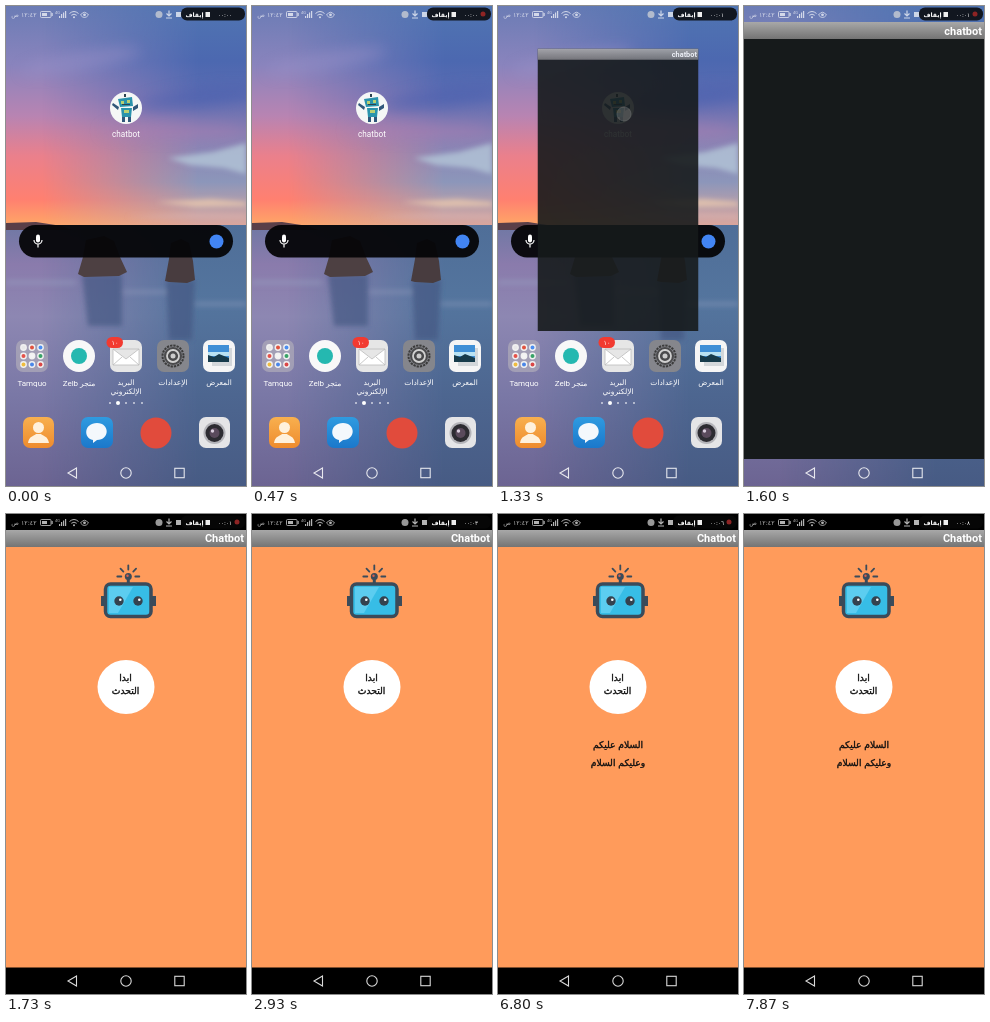
These frames come from a looping animation (240x480 px, 8000 ms). An HTML page:

```html
<!DOCTYPE html>
<html lang="ar">
<head>
<meta charset="utf-8">
<title>Chatbot</title>
<style>
  html, body { margin: 0; width: 100%; height: 100%; overflow: hidden; background: #000; }
  svg { display: block; width: 100%; height: 100%; }
  text { font-family: Roboto, "DejaVu Sans", sans-serif; fill: #fff; }
  .mid { text-anchor: middle; }
  .end { text-anchor: end; }
  .bold { font-weight: 700; }
  .label { font-size: 8px; text-anchor: middle; }
  .ar { font-family: "DejaVu Sans", sans-serif; font-size: 7.5px; text-anchor: middle; }
  .ink { font-size: 9.2px; fill: #111; stroke: #111; stroke-width: .35px; }
  .line { fill: none; stroke: #fff; }
</style>
</head>
<body>
<svg viewBox="0 0 240 480" preserveAspectRatio="none">
  <defs>
    <linearGradient id="skyLeft" x2="0" y2="1">
      <stop offset="0" stop-color="#6b7cb5"/>
      <stop offset=".27" stop-color="#8a84bd"/>
      <stop offset=".5" stop-color="#b884b2"/>
      <stop offset=".68" stop-color="#ea808c"/>
      <stop offset=".88" stop-color="#ff8070"/>
      <stop offset="1" stop-color="#ffa866"/>
    </linearGradient>
    <linearGradient id="skyRight" x2="0" y2="1">
      <stop offset="0" stop-color="#5075b2"/>
      <stop offset=".25" stop-color="#4c68b0"/>
      <stop offset=".42" stop-color="#5d6cb2"/>
      <stop offset=".57" stop-color="#8a7db2"/>
      <stop offset=".8" stop-color="#8c96ba"/>
      <stop offset="1" stop-color="#dca69c"/>
    </linearGradient>
    <linearGradient id="seaLeft" x2="0" y2="1">
      <stop offset="0" stop-color="#6f78a4"/>
      <stop offset=".15" stop-color="#8a7bac"/>
      <stop offset=".35" stop-color="#8d87b2"/>
      <stop offset=".65" stop-color="#7a78a6"/>
      <stop offset="1" stop-color="#6c6492"/>
    </linearGradient>
    <linearGradient id="seaRight" x2="0" y2="1">
      <stop offset="0" stop-color="#4f6e98"/>
      <stop offset=".3" stop-color="#54759e"/>
      <stop offset=".65" stop-color="#4d6690"/>
      <stop offset="1" stop-color="#475b84"/>
    </linearGradient>
    <linearGradient id="across">
      <stop offset=".15" stop-color="#000"/>
      <stop offset=".8" stop-color="#fff"/>
    </linearGradient>
    <mask id="rightward"><path fill="url(#across)" d="M0 0H240V480H0Z"/></mask>
    <linearGradient id="bar" x2="0" y2="1">
      <stop offset="0" stop-color="#a8a8a8"/>
      <stop offset="1" stop-color="#747474"/>
    </linearGradient>
    <linearGradient id="orange" x2="0" y2="1">
      <stop offset="0" stop-color="#f8b04f"/>
      <stop offset="1" stop-color="#ee8b2d"/>
    </linearGradient>
    <linearGradient id="blue" x2="0" y2="1">
      <stop offset="0" stop-color="#2f9be0"/>
      <stop offset="1" stop-color="#1b78cb"/>
    </linearGradient>
    <filter id="soft" x="-50%" y="-100%" width="200%" height="300%"><feGaussianBlur stdDeviation="7"/></filter>
    <filter id="haze" x="-50%" y="-100%" width="200%" height="300%"><feGaussianBlur stdDeviation="2.5"/></filter>
  </defs>

  <g id="home">
    <path fill="url(#skyLeft)" d="M0 0H240V220H0Z"/>
    <path fill="url(#skyRight)" d="M0 0H240V220H0Z" mask="url(#rightward)"/>
    <g filter="url(#soft)" opacity=".5">
      <ellipse cx="75" cy="55" rx="60" ry="8" fill="#9a91c8" transform="rotate(-10 75 55)"/>
      <ellipse cx="190" cy="92" rx="60" ry="9" fill="#4a5fae" transform="rotate(-8 190 92)"/>
      <ellipse cx="165" cy="125" rx="70" ry="7" fill="#a97fb2"/>
    </g>
    <g filter="url(#haze)">
      <path fill="#b3c6d8" opacity=".8" d="M162 152l45 -6 33 -9v31l-22 -6 -34 -3z"/>
      <path fill="#f2cfae" opacity=".7" d="M150 196l55 -3 35 3v4l-50 1z"/>
      <path fill="#d9b3b0" opacity=".6" d="M120 211l70 -4 50 1v5z"/>
    </g>
    <path fill="url(#seaLeft)" d="M0 219H240V480H0Z"/>
    <path fill="url(#seaRight)" d="M0 219H240V480H0Z" mask="url(#rightward)"/>
    <g filter="url(#haze)">
      <path fill="#445780" opacity=".65" d="M76 268h40v52h-34zM160 274h29l-3 60h-23z"/>
      <path fill="#98a0c0" opacity=".4" d="M0 274h70v5h-70zM118 284h42v4h-42zM190 296h50v4h-50z"/>
    </g>
    <path fill="#5a3f48" d="M0 217l30 -1 26 4 10 4H0Z"/>
    <path fill="#4d4042" d="M72 268l5 -17 3 -17 18 -4 10 5 6 16 7 15 -8 4 -35 1Z"/>
    <path fill="#483c3f" d="M159 275l4 -22 2 -16 10 -4 8 4 4 18 2 19 -8 3 -18 -1Z"/>

    <circle cx="120" cy="102" r="16" fill="#f5f7f6"/>
    <g fill="#2a93ac">
      <path d="M112 93l14 -2 1 9 -13 1zM115 102h11l-1 9h-9z"/>
      <path fill="#30577a" d="M107 97l6 4 -1 3 -6 -5zM127 101l5 -3v4l-5 3zM116 111h3v5h-3zM122 111h3v5h-3z"/>
      <path fill="#b9cf72" d="M115 95h3v3h-3zM121 94h3v3h-3zM118 104h5v3h-5z"/>
      <path fill="#2c4350" d="M118 88h2v3h-2zM116 98h8v1h-8z"/>
    </g>
    <text class="mid" x="120" y="131" font-size="8.2">chatbot</text>

    <rect x="13" y="219" width="214" height="32.5" rx="16.2" fill="#050507" opacity=".94"/>
    <rect x="30" y="228.500" width="4" height="8" rx="2" fill="#fff"/>
    <path class="line" d="M28 234a4 4 0 0 0 8 0M32 238v3.500" stroke-width="1.200"/>
    <circle cx="210.500" cy="235.500" r="7" fill="#4285f4"/>

    <rect x="10" y="334" width="32" height="32" rx="7" fill="#aaa6b8" opacity=".8"/>
    <g id="folder"></g>
    <circle cx="73" cy="350" r="16" fill="#f8f8f8"/>
    <circle cx="73" cy="350" r="8" fill="#25b8b0"/>

    <rect x="104" y="334" width="32" height="32" rx="7" fill="#e6e6e6"/>
    <path fill="#fff" stroke="#bbb" stroke-width=".8" d="M107 343h26v16h-26zl13 10 13 -10M107 359l9 -8M133 359l-9 -8"/>
    <rect x="100.500" y="331" width="16.500" height="11" rx="5.500" fill="#f23a30"/>
    <text class="ar" x="109" y="339" style="font-size:6.5px">١٠</text>

    <rect x="151" y="334" width="32" height="32" rx="7" fill="#85868c"/>
    <circle cx="167" cy="350" r="10.500" fill="none" stroke="#3b3b3b" stroke-width="2" stroke-dasharray="2.300 1"/>
    <circle cx="167" cy="350" r="9" fill="#4a4a4c"/>
    <circle cx="167" cy="350" r="6" fill="none" stroke="#d0d0d0" stroke-width="1.800"/>
    <circle cx="167" cy="350" r="2.500" fill="#ccc"/>

    <rect x="197" y="334" width="32" height="32" rx="7" fill="#f5f5f5"/>
    <path fill="#d3d7da" d="M206 342h20v18h-20z"/>
    <path fill="#3f8fd6" d="M202 339h21v17h-21z"/>
    <path fill="#b9e2f3" d="M202 346h21v4h-21z"/>
    <path fill="#173b4b" d="M202 356v-7l6 2 5 -3 10 4v4z"/>

    <text class="label" x="26" y="380">Tamquo</text>
    <text class="label" x="73" y="380">Zelb <tspan style="font-family:'DejaVu Sans',sans-serif;font-size:7.5px">متجر</tspan></text>
    <text class="ar" x="120" y="379">البريد</text>
    <text class="ar" x="120" y="388">الإلكتروني</text>
    <text class="ar" x="167" y="379">الإعدادات</text>
    <text class="ar" x="213" y="379">المعرض</text>
    <g id="pages" fill="#fff"></g>

    <rect x="17" y="411" width="31" height="31" rx="7" fill="url(#orange)"/>
    <circle cx="32.500" cy="421.500" r="5.500" fill="#fff1dc"/>
    <path fill="#fff1dc" d="M22 437c1 -7 6 -7 8 -9h5c2 2 7 2 8 9z"/>
    <rect x="75" y="411" width="32" height="31" rx="7" fill="url(#blue)"/>
    <path fill="#f4f8fc" d="M91 417c13 0 13 17 0 17l-4 3v-3c-10 -2 -9 -17 4 -17z"/>
    <circle cx="150" cy="427" r="15.500" fill="#e14b3c"/>
    <rect x="193" y="411" width="31" height="31" rx="7" fill="#e5e5e7"/>
    <circle cx="208.500" cy="427" r="11" fill="#b5b5ba"/>
    <circle cx="208.500" cy="427" r="9" fill="#2d2c32"/>
    <circle cx="208.500" cy="427" r="5" fill="#5a4a5c"/>
    <circle cx="206.500" cy="425" r="1.700" fill="#d9cddd"/>
  </g>

  <g id="splash">
    <path fill="#161a1b" d="M0 0H240V437H0Z"/>
    <path fill="url(#bar)" d="M0 0H240V17H0Z"/>
    <text class="end bold" x="238" y="12.500" font-size="11">chatbot</text>
  </g>

  <g id="app">
    <path d="M0 0H240V480H0Z"/>
    <path fill="#ff9b5b" d="M0 33H240V453.500H0Z"/>
    <path fill="url(#bar)" d="M0 16H240V33H0Z"/>
    <text class="end bold" x="238" y="28" font-size="11">Chatbot</text>

    <g id="rays" stroke="#3b4b5a" stroke-width="1.800" stroke-linecap="round"></g>
    <path fill="#3b4b5a" d="M120.800 64h3v6h-3zM95 82h4v10h-4zM146 82h4v10h-4z"/>
    <circle cx="122.300" cy="62.500" r="3.500" fill="#3b4b5a"/>
    <circle cx="121.500" cy="61.700" r="1.200" fill="#d8604d"/>
    <rect x="99.500" y="70" width="45.500" height="32.500" rx="5" fill="#37bde6" stroke="#3b4b5a" stroke-width="3.500"/>
    <path fill="#5ccdf0" d="M103 73h24l-15 26h-9z"/>
    <g fill="#34424f">
      <circle cx="113" cy="87" r="4.700"/><circle cx="132" cy="87" r="4.700"/>
      <circle cx="114.300" cy="85.700" r="1.300" fill="#fff"/><circle cx="133.300" cy="85.700" r="1.300" fill="#fff"/>
    </g>

    <ellipse cx="120" cy="173" rx="28.500" ry="27" fill="#fff"/>
    <text class="ar ink" x="119.500" y="167">ابدا</text>
    <text class="ar ink" x="119.500" y="180">التحدث</text>
    <g id="reply">
      <text class="ar ink" x="120" y="234">السلام عليكم</text>
      <text class="ar ink" x="120" y="252">وعليكم السلام</text>
    </g>
  </g>

  <circle id="touch" r="7" fill="#8a8a8a" stroke="#bbb" stroke-width=".8"/>

  <g id="status">
    <g opacity=".7">
      <text class="ar" x="18" y="11" style="font-size:6.3px">١٢:٤٢ ص</text>
      <rect class="line" x="34.500" y="5.500" width="10.500" height="6" rx="1" stroke-width=".9"/>
      <path fill="#fff" d="M36 7h5v3h-5zM45.500 7h1.200v3h-1.200z"/>
      <text x="49" y="8" font-size="4">4G</text>
      <path fill="#fff" d="M53 10h1.200v2h-1.200zM55 8h1.200v4h-1.200zM57 6.500h1.200v5.500h-1.200zM59 5h1.200v7h-1.200z"/>
      <path class="line" d="M63.500 7.500q4.500 -4 9 0M65.300 9.300q2.700 -2.300 5.400 0" stroke-width="1"/>
      <circle cx="68" cy="11.300" r="1" fill="#fff"/>
      <path class="line" d="M74.500 9q4 -5.500 8 0q-4 5 -8 0z" stroke-width=".9"/>
      <circle cx="78.500" cy="8.800" r="1.400" fill="#fff"/>
      <circle cx="153" cy="8.500" r="3.500" fill="#d9d9d9"/>
      <path class="line" d="M163 4.500v5M160.500 7.500l2.500 2.500 2.500 -2.500M160 12h6" stroke-width="1.200"/>
      <path fill="#fff" d="M170 6h5v5h-5z"/>
    </g>
    <rect x="175" y="1.500" width="64" height="13" rx="6" fill="#080808" opacity=".85"/>
    <text class="ar bold" x="188.500" y="10.800" style="font-size:6.1px">إيقاف</text>
    <path fill="#eee" d="M199.500 6h4.500v5h-4.500z"/>
    <text class="ar" id="timer" x="219" y="10.500" style="font-size:5.6px"></text>
    <circle id="record" cx="231" cy="8" r="2.500" fill="#8e2424"/>
  </g>

  <g class="line" stroke-width="1.100" opacity=".85">
    <path d="M70.500 462v10l-8.500 -5z"/>
    <circle cx="120" cy="467" r="5.200"/>
    <rect x="168.800" y="462.300" width="9.400" height="9.400"/>
  </g>
</svg>
<script>
const LOOP = 8000;
const OPEN = 1205, OPENED = 1535, READY = 1670, ANSWER = 5730;
const TAPS = [
  { from: 1000, to: 1400, x: 126, y: 108 },
  { from: 2330, to: 2800, x: 123, y: 184 }
];
const get = id => document.getElementById(id);
const show = (id, on) => get(id).setAttribute('visibility', on ? 'visible' : 'hidden');
const mix = (a, b, p) => a + (b - a) * p;
const clamp = v => Math.max(0, Math.min(1, v));

function add(id, tag, attrs) {
  const el = document.createElementNS('http://www.w3.org/2000/svg', tag);
  for (const key in attrs) el.setAttribute(key, attrs[key]);
  get(id).append(el);
}

['#e9e9e9', '#e0533f', '#4b8df0', '#e5524a', '#f4f4f4', '#38a267', '#f0bd3e', '#4a86e8', '#da4747']
  .forEach((fill, i) => add('folder', 'circle', {
    cx: 17.5 + i % 3 * 8.5, cy: 341.5 + Math.floor(i / 3) * 8.5, r: 2.7,
    fill, stroke: '#f1f1f1', 'stroke-width': 1.4
  }));

for (let i = 0; i < 5; i++)
  add('pages', 'circle', { cx: 104 + i * 8, cy: 397, r: i === 1 ? 2 : 1, opacity: i === 1 ? 1 : 0.7 });

for (let i = 0; i < 5; i++) {
  const a = Math.PI * (1 + i / 4), c = Math.cos(a), s = Math.sin(a);
  add('rays', 'line', { x1: 122.3 + 7 * c, y1: 62.5 + 7 * s, x2: 122.3 + 11 * c, y2: 62.5 + 11 * s });
}

function drawSplash(t) {
  const p = 1 - (1 - clamp((t - OPEN) / (OPENED - OPEN))) ** 2;
  const w = mix(32, 240, p), h = mix(32, 437, p);
  const y = mix(102, 234.5, p) - h / 2;
  const splash = get('splash');
  splash.setAttribute('transform', `translate(${120 - w / 2} ${y}) scale(${w / 240} ${h / 437})`);
  splash.setAttribute('opacity', Math.min(1, p * 1.45));
}

function drawTouch(t) {
  const tap = TAPS.find(({ from, to }) => t >= from && t < to);
  show('touch', tap);
  if (!tap) return;
  get('touch').setAttribute('cx', tap.x);
  get('touch').setAttribute('cy', tap.y);
  get('touch').setAttribute('opacity', 0.5 * clamp((tap.to - t) / 100));
}

function render(t) {
  show('splash', t >= OPEN && t < READY);
  show('app', t >= READY);
  show('reply', t >= ANSWER);
  drawSplash(t);
  drawTouch(t);
  const clock = t + 130;
  get('timer').textContent = '٠٠:٠' + '٠١٢٣٤٥٦٧٨'[Math.floor(clock / 1000)];
  show('record', clock % 1000 >= 530);
}

const start = performance.now();
function tick() {
  render((performance.now() - start) % LOOP);
  requestAnimationFrame(tick);
}
tick();
</script>
</body>
</html>
```
